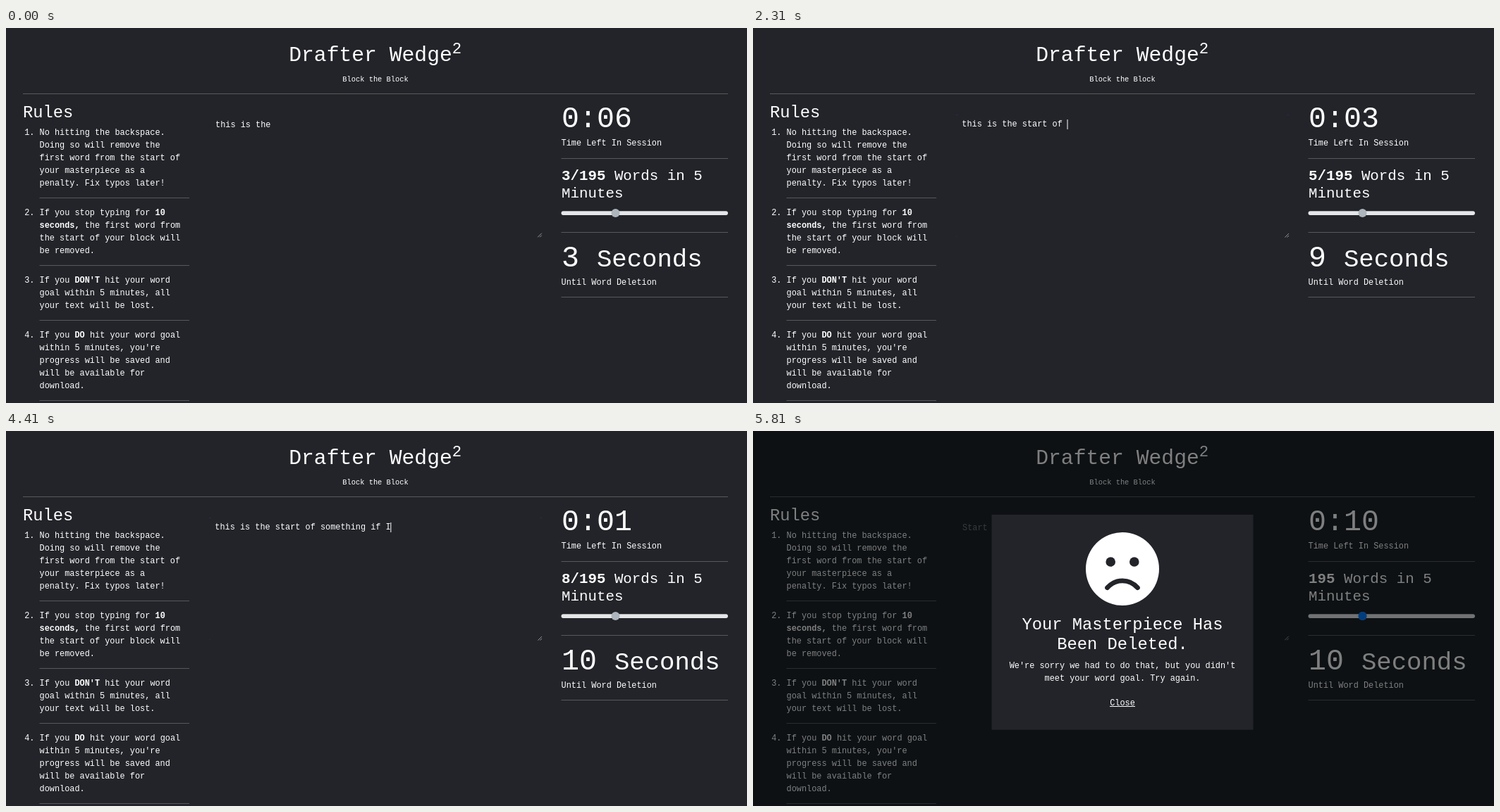
Recreate the animation shown at these times as an HTML page. Size 1051 by 533 pixels, loop 8 s.

```html
<!DOCTYPE html>
<html lang="en">
<head>
<meta charset="utf-8">
<title>Drafter Wedge</title>
<style>
  html, body { margin: 0; width: 100%; height: 100%; overflow: hidden; background: #222429; }
  svg { display: block; }
  text { font: 11.88px "Liberation Mono", "Courier New", monospace; fill: #fff; white-space: pre; }
  .bold { font-weight: 700; }
  .mid { text-anchor: middle; }
  .rule { stroke: #57585c; stroke-width: 1; }
  .line { fill: none; stroke-linecap: round; }
</style>
</head>
<body>
<svg id="stage" width="1051" height="533" viewBox="0 0 1051 533"></svg>
<script>
const LOOP = 8000, STEP = 70;
const PHRASE = 'this is the start of something if I do not';
const CHAR_WIDTH = 7.13;

// [time in ms, value from then on]
const TYPED = [[0, 11], [1050, 12], [1190, 13], [1330, 14], [1400, 15], [1540, 16], [1680, 17], [1750, 18],
  [1960, 19], [2030, 20], [2100, 21], [2590, 22], [2730, 23], [2800, 24], [2870, 25], [3010, 26], [3080, 27],
  [3220, 28], [3290, 29], [3570, 30], [3710, 31], [4060, 32], [4200, 34], [4410, 35], [4480, 36],
  [4690, 37], [4830, 38], [4970, 39], [5250, 40]];
const CLOCK = [[0, '0:06'], [210, '0:05'], [1260, '0:04'], [2310, '0:03'], [3360, '0:02'], [4410, '0:01'], [5460, '0:10']];
const COUNTDOWN = [[0, 3], [210, 2], [1050, 10], [1260, 9], [1330, 10], [2310, 9], [2590, 10], [3360, 9], [3570, 10]];
const FOCUS = 630, ENDED = 5460, MODAL = 5450;

const RULES = [
  [152.4, 'No hitting the backspace.', 'Doing so will remove the', 'first word from the start of', 'your masterpiece as a', 'penalty. Fix typos later!'],
  [266.4, 'If you stop typing for *10*', '*seconds,* the first word from', 'the start of your block will', 'be removed.'],
  [362.4, "If you *DON'T* hit your word", 'goal within 5 minutes, all', 'your text will be lost.'],
  [440.4, 'If you *DO* hit your word goal', "within 5 minutes, you're", 'progress will be saved and', 'will be available for', 'download.']
];

const bold = s => s.replace(/\*(.+?)\*/g, '<tspan class="bold">$1</tspan>');
const text = (x, y, s, size = 11.88, attrs = '') =>
  `<text x="${x}" y="${y}" style="font-size:${size}px" ${attrs}>${bold(s)}</text>`;
const centered = (y, s, size) => text(524, y, s, size, 'class="mid"');
// Rules sit on whole pixel rows so they stay one pixel thin.
const rule = (x1, x2, y) => `<path class="rule" d="M${x1} ${Math.floor(y) + 0.5}H${x2}"/>`;
const dot = (x, y, r, fill, attrs = '') => `<circle cx="${x}" cy="${y}" r="${r}" fill="${fill}" ${attrs}/>`;

const rulesList = RULES.map(([top, ...lines], i) =>
  text(26.2, top, `${i + 1}.`) +
  lines.map((line, row) => text(47.6, top + row * 17.85, line)).join('') +
  rule(47.5, 260, top + lines.length * 17.85)).join('');

const stage = document.getElementById('stage');
stage.innerHTML = `
  <rect width="1051" height="533" fill="#222429"/>
  <rect class="fade" width="1051" height="533" fill="#1a2228"/>
  ${text(401.2, 47, 'Drafter Wedge<tspan dy="-11" style="font-size:22.3px">2</tspan>', 29.7)}
  ${centered(75.5, 'Block the Block', 10.4)}
  ${rule(24, 1024, 93)}
  ${text(24, 126.6, 'Rules', 23.77)}
  ${rulesList}

  ${text(297, 140.7, '', 11.88, 'id="draft"')}
  <rect id="caret" y="130" width="1" height="14" fill="#fff"/>
  <path id="corners" stroke="#292b52" d="M288 123.500h2.500M757.500 123.500h2.500M288 296.500h1.500"/>
  <path id="grip" class="line" stroke="#b5b6b8" stroke-width=".8" d="M754.500 297l5-5M757.500 297l2-2"/>

  ${text(788, 140.7, '', 41.6, 'id="clock"')}
  ${text(787.5, 167.3, 'Time Left In Session')}
  ${rule(787.5, 1024, 185)}
  ${text(788, 215.7, '', 20.8, 'id="goal"')}
  ${text(788, 240.7, 'Minutes', 20.8)}
  <rect x="787.5" y="260.200" width="236.500" height="5.800" rx="2.900" fill="#e4e6e8"/>
  ${dot(864.5, 263.1, 6, '#adb5bd')}
  ${dot(864.5, 263.1, 6, '#007bff', 'class="fade"')}
  ${rule(787.5, 1024, 290)}
  ${text(788, 338.8, '', 41.6, 'id="countdown"')}
  ${text(0, 338.8, 'Seconds', 35.65, 'id="unit"')}
  ${text(787.5, 364.8, 'Until Word Deletion')}
  ${rule(787.5, 1024, 382)}

  <g class="fade"><rect width="1051" height="533" opacity=".5"/></g>
  <g id="modal" class="fade">
    <rect x="338.500" y="119" width="371" height="305.700" fill="#232429"/>
    ${dot(524, 196, 52, '#fff')}
    ${dot(507.2, 186, 6.8, '#232429')}
    ${dot(540.8, 186, 6.8, '#232429')}
    <path class="line" stroke="#232429" stroke-width="6.700"
      d="M502.500 222.800C508.400 216 515.700 212.800 524 212.800S539.600 216 545.500 222.800"/>
    ${centered(281.9, 'Your Masterpiece Has', 23.77)}
    ${centered(310.4, 'Been Deleted.', 23.77)}
    ${centered(337, "We're sorry we had to do that, but you didn't")}
    ${centered(354.8, 'meet your word goal. Try again.')}
    ${centered(389.8, 'Close')}
    <path stroke="#fff" d="M506 391.500h36"/>
  </g>`;

const el = id => document.getElementById(id);
const fades = document.querySelectorAll('.fade');
const valueAt = (list, t) => list.findLast(([start]) => start <= t)[1];
const clamp = v => Math.max(0, Math.min(1, v));
const show = (node, on) => node.setAttribute('visibility', on ? 'visible' : 'hidden');

function render(t) {
  t = Math.floor(t / STEP) * STEP;
  const ended = t >= ENDED, focused = t >= FOCUS && !ended;
  const length = valueAt(TYPED, t), typed = PHRASE.slice(0, length);
  const words = typed.trim().split(' ').length;
  const seconds = String(valueAt(COUNTDOWN, t));

  const draft = el('draft');
  draft.textContent = ended ? 'Start Typing To Begin...' : typed;
  draft.style.fill = ended ? '#6c757d' : '#fff';
  draft.setAttribute('transform', focused ? 'translate(-.7 -.7)' : '');
  el('grip').setAttribute('transform', focused ? 'translate(.3 .3)' : '');
  el('caret').setAttribute('x', 295.8 + CHAR_WIDTH * length);
  show(el('caret'), focused);
  show(el('corners'), t >= FOCUS && t < ENDED + STEP);

  el('clock').textContent = valueAt(CLOCK, t);
  el('goal').innerHTML = bold(`*${ended ? '' : words + '/'}195* Words in 5`);
  el('countdown').textContent = seconds;
  el('unit').setAttribute('x', 788 + 24.96 * (seconds.length + 1));

  const opacity = t > ENDED ? clamp((t - MODAL) / 150) : 0;
  const remaining = 1 - clamp((t - MODAL) / 300);
  fades.forEach(node => node.setAttribute('opacity', opacity));
  el('modal').setAttribute('transform', `translate(0 ${-37.2 * remaining ** 1.66})`);
}

const start = performance.now();
function frame() {
  render((performance.now() - start) % LOOP);
  requestAnimationFrame(frame);
}
frame();
</script>
</body>
</html>
```
